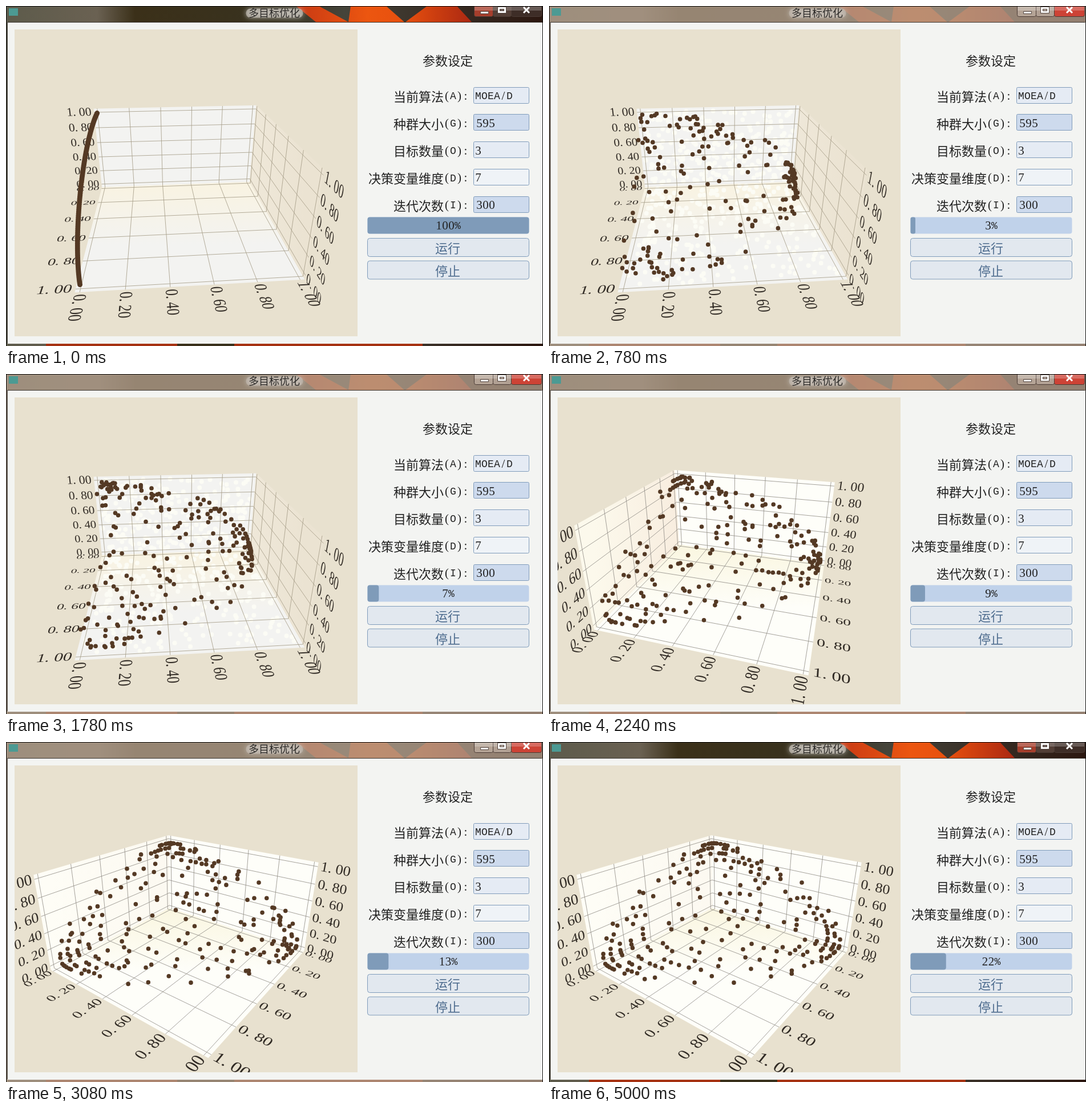
These frames come from a looping animation (941 px wide and 595 px high, 5020 ms). An HTML page with a canvas:

```html
<!DOCTYPE html>
<html lang="zh">
<head>
<meta charset="utf-8">
<style>
  html, body { margin: 0; width: 100%; height: 100%; overflow: hidden; background: #f3f4f2; }
  canvas { display: block; }
</style>
</head>
<body>
<canvas id="stage" width="941" height="595"></canvas>
<script>
const ctx = document.getElementById('stage').getContext('2d');
const LOOP = 5020, START = 100;
const SERIF = '"Liberation Serif", serif', MONO = '"Liberation Mono", monospace';
const CJK = '"Noto Sans CJK SC", "Noto Sans CJK", sans-serif';
const W = 1.55, H = 0.82, EM = 0.228, GAP = 0.05;
const TICKS = [0, 0.2, 0.4, 0.6, 0.8, 1];

let seed = 20;
function rand() {
  seed = (seed + 0x6D2B79F5) | 0;
  let v = Math.imul(seed ^ (seed >>> 15), 1 | seed);
  v = (v + Math.imul(v ^ (v >>> 7), 61 | v)) ^ v;
  return ((v ^ (v >>> 14)) >>> 0) / 4294967296;
}
const clamp = (v, a = 0, b = 1) => Math.min(b, Math.max(a, v));
const unit = v => { const n = Math.hypot(...v); return v.map(c => c / n); };

// Population on the unit sphere: f is proportional to 1 / weight.
const population = [];
for (let i = 1; i < 32; i++) {
  for (let j = 1; i + j < 33; j++) {
    const weight = [i, j, 33 - i - j];
    if (rand() > (Math.min(...weight) < 6 ? 0.48 : 0.36)) continue;
    population.push({
      weight,
      noise: weight.map(() => (rand() - 0.5) * 4),
      spread: 2 * rand(),
      arrival: 14 + 36 * rand()
    });
  }
}
const arc = Array.from({ length: 120 }, (_, i) => {
  const a = i / 119 * Math.PI / 2;
  return [0, Math.sin(a), Math.cos(a)];
});
const faint = Array.from({ length: 520 }, (_, i) => {
  const a = (rand() * 2 - 1) * 0.96 * W, b = (rand() * 2 - 1) * 0.93;
  return i % 2 ? [a, -W, b * H] : [a, b * W, -H];
});

function pointsAt(t) {
  if (t < START) return arc;
  const step = Math.floor((t - START) * 0.0135);
  return population.map(p => {
    const k = clamp(1 - step / p.arrival);
    const r = 1 + p.spread * Math.exp(-step / 2);
    return unit(p.weight.map((w, i) => Math.exp(p.noise[i] * k) / w)).map(c => c * r);
  }).filter(p => Math.max(...p) <= 1);
}

function yawAt(t) {
  if (t < 2240) return 49.7 - 21.7 * clamp((t - 1800) / 440);
  return 28 - 20.1 * clamp((t - 2240) / 510);
}

let yaw = 0;
const PITCH = 25.5 * Math.PI / 180;
function project([x, y, z]) {
  const a = yaw + Math.PI / 4, b = yaw - Math.PI / 4;
  const side = x * Math.sin(a) + y * Math.sin(b);
  const near = x * Math.cos(a) + y * Math.cos(b);
  const scale = 648 / (6 - near * Math.cos(PITCH) - z * Math.sin(PITCH));
  return [310 + side * scale, 306 - (z * Math.cos(PITCH) - near * Math.sin(PITCH)) * scale];
}
const world = ([x, y, z]) => [(x - 0.5) * 2.97, (y - 0.5) * 2.97, (z - 0.5) * 1.5];

function polygon(points, fill) {
  ctx.beginPath();
  points.forEach(p => ctx.lineTo(...p));
  ctx.closePath();
  ctx.fillStyle = fill;
  ctx.fill();
}
function gradient(x0, y0, x1, y1, stops) {
  const g = ctx.createLinearGradient(x0, y0, x1, y1);
  stops.forEach(([at, color]) => g.addColorStop(at, color));
  return g;
}
function line(a, b) {
  ctx.moveTo(...project(a));
  ctx.lineTo(...project(b));
}
function dots(points, radius, fill) {
  ctx.fillStyle = fill;
  ctx.beginPath();
  for (const p of points) {
    const [x, y] = project(p);
    ctx.moveTo(x + radius, y);
    ctx.arc(x, y, radius, 0, 7);
  }
  ctx.fill();
}

// Text lying in the plane spanned by dir and up.
function label(value, at, dir, up) {
  const slope = axis => {
    const shift = s => project(at.map((c, i) => c + axis[i] * s));
    const [p, q] = [shift(-0.05), shift(0.05)];
    return [(q[0] - p[0]) * EM / 5, (q[1] - p[1]) * EM / 5];
  };
  const [a, b] = slope(dir), [c, d] = slope(up);
  ctx.save();
  ctx.transform(a, b, -c, -d, ...project(at));
  ctx.fillText(value.toFixed(2).replace('.', '. '), 0, 0);
  ctx.restore();
}

function drawChart(t) {
  yaw = yawAt(t) * Math.PI / 180;
  const flip = yaw > Math.PI / 4, s = flip ? 1 : -1;
  ctx.save();
  ctx.beginPath();
  ctx.rect(15, 41, 601, 537);
  ctx.clip();
  ctx.fillStyle = '#e8e1cf';
  ctx.fillRect(15, 41, 601, 537);

  const face = corners => corners.map(project);
  const plain = flip ? '#f3f3f1' : '#fefef9';
  const floor = face([[-W, -W, -H], [W, -W, -H], [W, W, -H], [-W, W, -H]]);
  const top = Math.min(floor[0][1], floor[1][1]);
  polygon(floor, gradient(0, top, 0, top + 110, [[0, flip ? '#f9f3e1' : '#faf6e0'], [1, plain]]));
  polygon(face([[-W, -W, -H], [W, -W, -H], [W, -W, H], [-W, -W, H]]), plain);
  const wall = face([[s * W, -W, -H], [s * W, W, -H], [s * W, W, H], [s * W, -W, H]]);
  const inner = flip ? '#efe8d9' : yaw > 0.3 ? '#f8eddf' : '#fcf9f1';
  const outer = flip ? '#ebe3d2' : yaw > 0.3 ? '#fcf9ec' : '#fefdf6';
  polygon(wall, gradient(wall[1][0], 0, wall[0][0], 0, [[0, outer], [1, inner]]));

  if (t > 350 && t < 1800) dots(faint, 4, '#fcfcf5');

  ctx.beginPath();
  for (const v of TICKS) {
    const [x, , z] = world([v, v, v]);
    line([x, -W, -H], [x, W, -H]);
    line([-W, x, -H], [W, x, -H]);
    line([x, -W, -H], [x, -W, H]);
    line([-W, -W, z], [W, -W, z]);
    line([s * W, x, -H], [s * W, x, H]);
    line([s * W, -W, z], [s * W, W, z]);
  }
  ctx.lineWidth = 0.8;
  ctx.strokeStyle = flip ? '#a39a84' : '#8e8b84';
  ctx.stroke();

  ctx.font = '50px ' + SERIF;
  ctx.textAlign = 'center';
  ctx.textBaseline = 'middle';
  ctx.fillStyle = '#302a24';
  const out = W + GAP + EM, X = [1, 0, 0], Z = [0, 0, 1];
  for (const v of TICKS) {
    const [x, y, z] = world([v, v, v]);
    label(v, [x, out, -H], [0, s, 0], [s, 0, 0]);
    label(v, [-s * out, y, -H], X, [0, -1, 0]);
    label(v, [-s * out, -W, z], X, Z);
    label(v, [s * W, out, z], [0, s, 0], Z);
  }

  dots(pointsAt(t).map(world), t < START ? 4.5 : 3.8, '#543924');
  ctx.restore();
}

function box(x, y, w, h, fill, stroke, r = 3) {
  ctx.beginPath();
  ctx.roundRect(x + 0.5, y + 0.5, w, h, r);
  ctx.fillStyle = fill;
  ctx.fill();
  if (!stroke) return;
  ctx.lineWidth = 1;
  ctx.strokeStyle = stroke;
  ctx.stroke();
}

// Fixed cells: 22 px for ideographs, 11 px for everything else.
function cells(text, x, y, color = '#222', align = 0) {
  const width = c => c > '\u2e80' ? 22 : 11;
  x -= align * [...text].reduce((sum, c) => sum + width(c), 0);
  ctx.fillStyle = color;
  ctx.textAlign = 'center';
  ctx.textBaseline = 'middle';
  for (const c of text) {
    const w = width(c);
    ctx.font = w > 11 ? '300 22px ' + CJK : /[A-Z%]/.test(c) ? '18px ' + MONO : '21px ' + SERIF;
    ctx.fillText(c, x + w / 2, y + 1);
    x += w;
  }
}

function drawPanel(t) {
  const border = '#809cbb';
  cells('参数设定', 774, 95, undefined, 0.5);
  [
    ['当前算法(A):', 'MOEA/D', '#e5ebf4', 822],
    ['种群大小(G):', '595', '#cddaed', 824],
    ['目标数量(O):', '3', '#e5ebf4', 822],
    ['决策变量维度(D):', '7', '#eff3f7', 822],
    ['迭代次数(I):', '300', '#cddaed', 824]
  ].forEach(([name, value, fill, x], i) => {
    const y = 156.5 + i * 47.8;
    cells(name, 811, y + 1, undefined, 1);
    box(819, Math.round(y - 15), 97, 28, fill, border, 2);
    cells(value, x, y + 1);
  });

  const percent = t < START ? 100 : Math.floor((t - START) * 0.0045);
  box(633, 369, 283, 29, '#c0d2ea', '', 4);
  if (percent) box(633, 369, 283 * percent / 100, 29, '#7f9bb9', '', Math.min(4, percent));
  cells(percent + '%', 775, 384, undefined, 0.5);
  ['运行', '停止'].forEach((text, i) => {
    box(633, 406 + i * 39.5, 283, 32, '#e2e8ef', border, 4);
    cells(text, 774, 423 + i * 39.5, '#4f6d8f', 0.5);
  });
}

function drawFrame(t) {
  const pale = t < 2500 ? clamp((t - START) / 250) : clamp((4980 - t) / 240);
  ctx.fillStyle = gradient(0, 0, 941, 0, [
    [0, '#5d5b4b'], [0.17, '#6a6152'], [0.24, '#3b3019'],
    [0.5, '#38321f'], [0.63, '#45443a'], [1, '#2c1710']
  ]);
  ctx.fillRect(0, 0, 941, 595);
  const flame = gradient(510, 0, 820, 0, [
    [0, '#c93a14'], [0.4, '#ec5610'], [0.6, '#e8500e'], [1, '#a92712']
  ]);
  polygon([[508, 0], [548, 0], [600, 28], [543, 28]], flame);
  polygon([[604, 0], [666, 0], [698, 28], [600, 28]], flame);
  polygon([[738, 0], [790, 0], [816, 28], [700, 28]], flame);
  ctx.fillStyle = '#a63212';
  ctx.fillRect(70, 590, 230, 5);
  ctx.fillRect(400, 590, 330, 5);
  ctx.fillStyle = `rgba(175,156,139,${0.79 * pale})`;
  ctx.fillRect(0, 0, 941, 595);

  ctx.save();
  ctx.shadowColor = '#ddd';
  ctx.shadowBlur = 10;
  box(420, 4, 100, 16, `rgba(205,198,190,${0.65 - 0.15 * pale})`, '', 8);
  ctx.restore();
  ctx.fillStyle = '#2c2a28';
  ctx.font = '300 18px ' + CJK;
  ctx.textAlign = 'center';
  ctx.textBaseline = 'middle';
  ctx.fillText('多目标优化', 470, 12);
  ctx.fillStyle = '#4c9a93';
  ctx.fillRect(5, 4, 16, 13);

  const mix = (a, b) => `rgb(${a.map((c, i) => Math.round(c + (b[i] - c) * pale))})`;
  box(820, -4, 33, 22, mix([166, 62, 44], [181, 164, 150]), '#4b3b35');
  box(853, -4, 32, 22, mix([82, 62, 54], [177, 160, 147]), '#4b3b35');
  box(885, -4, 53, 22, mix([62, 45, 39], [205, 67, 54]), '#4b3b35');
  ctx.fillStyle = 'rgba(255,255,255,0.22)';
  ctx.fillRect(821, 1, 117, 7);
  box(831, 9, 14, 4, '#fff', '#54463f', 0);
  ctx.lineWidth = 5;
  ctx.strokeStyle = '#54463f';
  ctx.strokeRect(863.5, 3.5, 11, 7);
  ctx.lineWidth = 3;
  ctx.strokeStyle = '#fff';
  ctx.strokeRect(863.5, 3.5, 11, 7);
  ctx.beginPath();
  ctx.moveTo(907, 2);
  ctx.lineTo(917, 12);
  ctx.moveTo(917, 2);
  ctx.lineTo(907, 12);
  ctx.stroke();

  ctx.fillStyle = '#3d3833';
  ctx.fillRect(2, 28, 937, 562);
  ctx.fillStyle = '#f3f4f2';
  ctx.fillRect(3, 29, 937, 562);
  ctx.fillStyle = '#111';
  ctx.fillRect(0, 0, 941, 1);
  ctx.fillRect(0, 0, 1, 595);
  ctx.fillRect(940, 0, 1, 595);
}

function render(now) {
  const t = now % LOOP;
  drawFrame(t);
  drawChart(t);
  drawPanel(t);
  requestAnimationFrame(render);
}
requestAnimationFrame(render);
</script>
</body>
</html>
```
